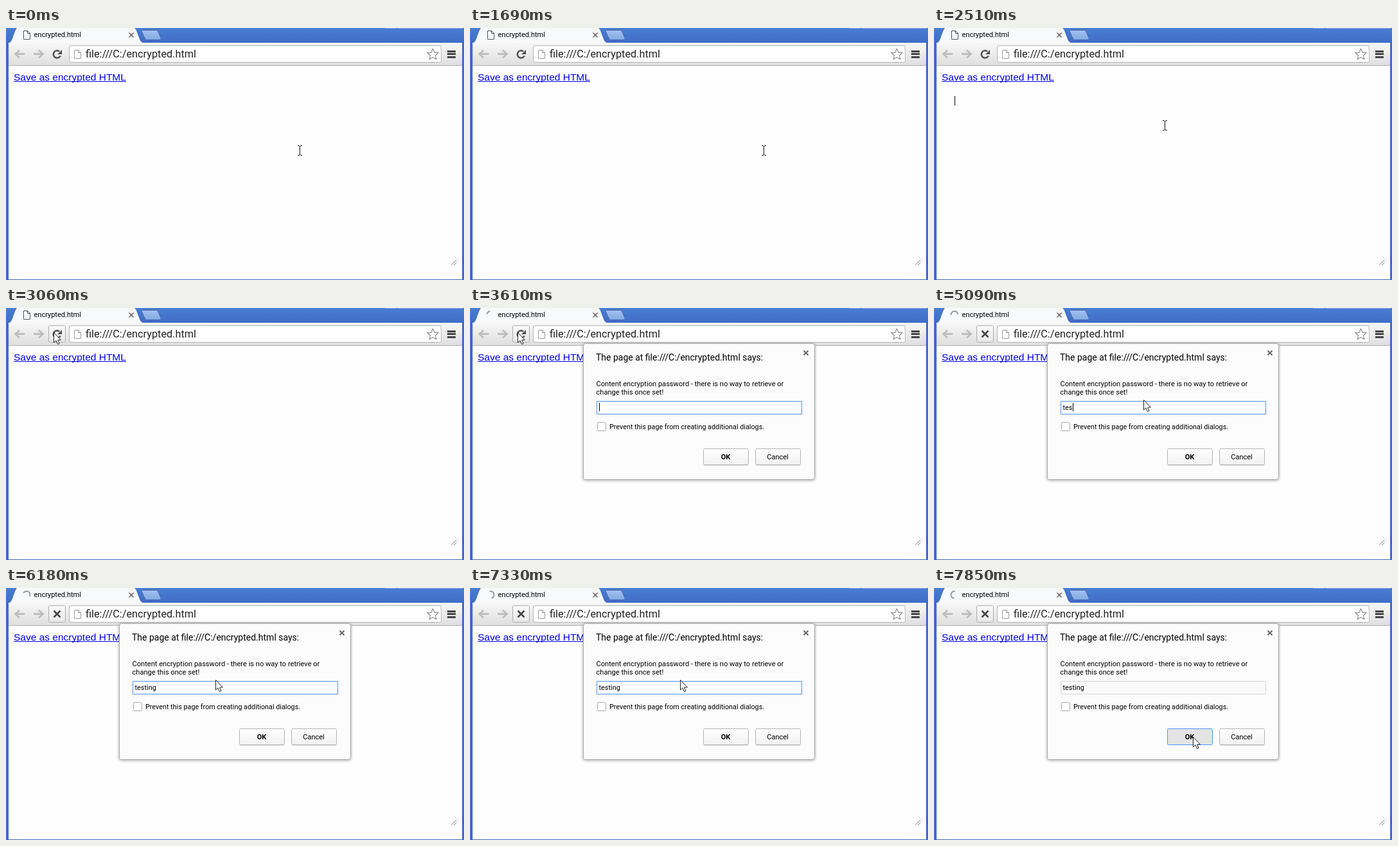
An HTML page with a canvas that plays this animation: 713 by 393 pixels, repeating every 8 s.

```html
<!DOCTYPE html>
<html lang="en">
<head>
<meta charset="utf-8">
<title>Encrypted page</title>
<style>
html, body { margin: 0; width: 100%; height: 100%; overflow: hidden; }
canvas { display: block; }
</style>
</head>
<body>
<canvas id="stage" width="713" height="393"></canvas>
<script>
const c = document.getElementById('stage').getContext('2d');
const LOOP = 8000;
const UI = 'Roboto, sans-serif';
const FOCUS = '#4d90fe';

// Screen updates: [first, last, intervals]; the picture holds in between.
const bursts = [[2120, 3060, 7], [3330, 4270, 7], [4390, 5330, 7],
  [5480, 6430, 7], [6580, 7570, 7], [7720, 7850, 1]];
const DIALOG = 3470, PRESS = 7850;
const password = 'testing';
const keyTimes = [4520, 4790, 5050, 5190, 5480, 5550, 5610];
const mousePath = [[2120, 457, 191], [2930, 74, 38], [3740, 74, 38], [4270, 326, 143],
  [7200, 326, 143], [7280, 327, 143], [7570, 445, 231], [7720, 403, 232]];

function hold(t) {
  const burst = bursts.findLast(b => t >= b[0]);
  if (!burst) return t;
  const [first, last, n] = burst;
  const step = (last - first) / n;
  return first + Math.min(n, Math.floor((t - first) / step + 1e-6)) * step;
}

function mouseAt(t) {
  const next = mousePath.findIndex(p => p[0] > t);
  if (next === 0) return mousePath[0].slice(1);
  if (next < 0) return mousePath.at(-1).slice(1);
  const [t0, x0, y0] = mousePath[next - 1], [t1, x1, y1] = mousePath[next];
  const u = (t - t0) / (t1 - t0), e = u * u * (3 - 2 * u);
  return [Math.round(x0 + (x1 - x0) * e), Math.round(y0 + (y1 - y0) * e)];
}

function vertical(y0, y1, top, bottom) {
  const g = c.createLinearGradient(0, y0, 0, y1);
  g.addColorStop(0, top);
  g.addColorStop(1, bottom);
  return g;
}

function rect(x, y, w, h, fill) {
  c.fillStyle = fill;
  c.fillRect(x, y, w, h);
}

function box(x, y, w, h, r, fill, stroke) {
  c.beginPath();
  c.roundRect(x + .5, y + .5, w - 1, h - 1, r);
  c.fillStyle = fill;
  c.fill();
  c.lineWidth = 1;
  c.strokeStyle = stroke;
  c.stroke();
}

function shape(d, x, y, fill, stroke, width = 1) {
  const path = new Path2D(d);
  c.save();
  c.translate(x, y);
  if (fill) { c.fillStyle = fill; c.fill(path); }
  if (stroke) { c.strokeStyle = stroke; c.lineWidth = width; c.stroke(path); }
  c.restore();
}

function text(s, x, y, size, { color = '#000', family = UI, weight = '', align = 'left' } = {}) {
  c.font = `${weight} ${size}px ${family}`;
  c.textAlign = align;
  c.fillStyle = color;
  c.fillText(s, x, y);
}

const cross = (x, y, r, color, width) =>
  shape(`M${-r} ${-r}L${r} ${r}M${r} ${-r}L${-r} ${r}`, x, y, null, color, width);

const pageIcon = (x, y, color) =>
  shape('M.5 .5H6.5L10.5 4.5V13.5H.5ZM6.5 .5V4.5H10.5', x, y, '#fff', color);

function spinner(t) {
  const start = t < 3740 ? 3.3 : (t - 7330) / 1000 * 2 * Math.PI - Math.PI / 2;
  c.beginPath();
  c.arc(32, 10.5, 5.5, start, start + Math.min(Math.PI, (t - DIALOG) / 100));
  c.strokeStyle = '#9a9a9a';
  c.lineWidth = 2;
  c.stroke();
}

function titleBar(t) {
  rect(0, 0, 713, 393, '#3f6cc4');
  rect(0, 0, 713, 24, vertical(0, 24, '#4b7dd3', '#3d6cc5'));
  rect(590, 0, 18, 1, '#86a8e2');
  rect(610, 0, 101, 1, '#86a8e2');
  shape('M3 23.5C7 23 8 20 10 15L14 4Q15.500 0 18 -1H199Q202 0 203.500 4L208 16Q210 23 215 23.500Z',
    0, 0, '#f8f9fb', '#4a70b8');
  shape('M213 3.500H234Q236 3.500 237 6L241 15.500Q242 18.500 239 18.500H220Q217 18.500 216 16L211.500 6Q210.500 3.500 213 3.500Z',
    0, 0, vertical(3, 19, '#a5c2ef', '#82a8e4'), '#3f68b4');
  if (t < DIALOG) pageIcon(27, 4, '#4c4c4c'); else spinner(t);
  text('encrypted.html', 43.5, 14, 11);
  cross(195, 11, 3.5, '#666', 1.7);
}

function reloadButton(t, mouseX, mouseY) {
  const over = mouseX > 65 && mouseX < 94 && mouseY < 55;
  if (over || t >= DIALOG) {
    const pressed = t >= 3330 && t < DIALOG;
    box(66, 27, 27, 27, 2, pressed ? '#dcdcdc' : vertical(27, 54, '#fafafa', '#e6e6e6'), '#adadad');
  }
  if (t >= DIALOG && !over) return cross(79.5, 40.5, 5, '#444', 2.6);
  c.beginPath();
  c.arc(79.5, 41, 5.7, .45, 5.35);
  c.strokeStyle = '#505050';
  c.lineWidth = 2.5;
  c.stroke();
  shape('M0 0V-7L-7 0Z', 87, 41, '#505050');
}

function toolbar(t, mouseX, mouseY) {
  rect(4, 23, 706, 36, vertical(23, 58, '#f7f7f7', '#dfdfdf'));
  rect(4, 58, 706, 1, '#b2b2b2');
  const arrow = 'M8 -6L1.500 0L8 6M2 0H16';
  shape(arrow, 13, 40.5, null, '#bdbdbd', 2.8);
  c.save();
  c.scale(-1, 1);
  shape(arrow, -59, 40.5, null, '#bdbdbd', 2.8);
  c.restore();
  reloadButton(t, mouseX, mouseY);
  box(98, 27, 580, 27, 2, '#fff', '#b4b4b4');
  pageIcon(106, 34, '#999');
  text('file:///C:/encrypted.html', 124, 46, 16.3, { color: '#222' });
  shape('M0 -8.500L2.500 -2.800L8.600 -2.300L4 1.800L5.400 7.800L0 4.600L-5.400 7.800L-4 1.800L-8.600 -2.300L-2.500 -2.800Z',
    664.5, 41, '#fff', '#8d8d8d', 1.2);
  for (const y of [35, 39, 44]) rect(687, y, 13, 3, '#454545');
}

function page(t) {
  rect(4, 59, 706, 333, '#fefefe');
  text('Save as encrypted HTML', 12, 82, 15.5,
    { color: '#0000ee', family: 'Liberation Sans, Arial, sans-serif' });
  rect(12, 83, 175, 1, '#0000ee');
  shape('M0 8L8 0M4 8L8 4', 693.5, 361.5, null, '#777');
  const caretOn = [[140, 710], [1140, 1690], [2120, 2650]].some(([a, b]) => t >= a && t < b);
  if (caretOn) rect(32, 106, 1, 15, '#000');
}

function button(label, x, weight, pressed) {
  box(x, 219, 71, 26, 2, pressed ? '#e4e4e4' : vertical(219, 245, '#fefefe', '#f1f1f1'),
    pressed ? FOCUS : '#b3b3b3');
  if (!pressed) rect(x + 1, 245, 69, 1, '#ddd');
  text(label, x + 35, 236, 11, { weight, align: 'center' });
}

function dialog(t) {
  const pressed = t >= PRESS;
  c.save();
  c.shadowColor = 'rgba(0,0,0,.3)';
  c.shadowBlur = 4;
  c.shadowOffsetY = 1;
  box(176, 55, 361, 213, 3, '#fcfcfc', '#a9a9a9');
  c.restore();
  box(176, 55, 361, 213, 3, '#fcfcfc', '#a9a9a9');
  text('The page at file:///C:/encrypted.html says:', 196, 82, 14);
  cross(523, 70, 3.5, '#666', 2);
  text('Content encryption password - there is no way to retrieve or', 196.5, 122, 11.1);
  text('change this once set!', 196.5, 135, 11.1);

  box(197, 145, 320, 21, 0, pressed ? '#fafafa' : '#fff', pressed ? '#d4d4d4' : FOCUS);
  const typed = keyTimes.filter(k => t >= k).length;
  const entry = password.slice(0, typed);
  text(entry, 200.5, 159, 10.9);
  const lastKey = typed ? keyTimes[typed - 1] : DIALOG;
  if (!pressed && (t - lastKey) % 1060 < 530)
    rect(Math.round(201 + c.measureText(entry).width), 148, 1, 13, '#000');

  box(198, 178, 14, 14, 2, '#fff', '#aaa');
  text('Prevent this page from creating additional dialogs.', 217, 189, 10.8);
  button('OK', 363, 'bold', pressed);
  button('Cancel', 444, '', false);
}

function pointer(x, y, beam) {
  if (beam) shape('M-3 -7.500H-1L.5 -6.500L2 -7.500H4M.5 -6.500V6.500M-3 7.500H-1L.5 6.500L2 7.500H4',
    x, y, null, '#111');
  else shape('M.5 .5V16L4 12.800L6.500 18.500L9 17.500L6.600 12H11.500Z', x, y, '#fff', '#222');
}

function draw(now) {
  const t = hold(now % LOOP);
  const [x, y] = mouseAt(t);
  titleBar(t);
  toolbar(t, x, y);
  page(t);
  if (t >= DIALOG) dialog(t);
  pointer(x, y, t < DIALOG && y > 104);
  requestAnimationFrame(draw);
}
requestAnimationFrame(draw);
</script>
</body>
</html>
```
